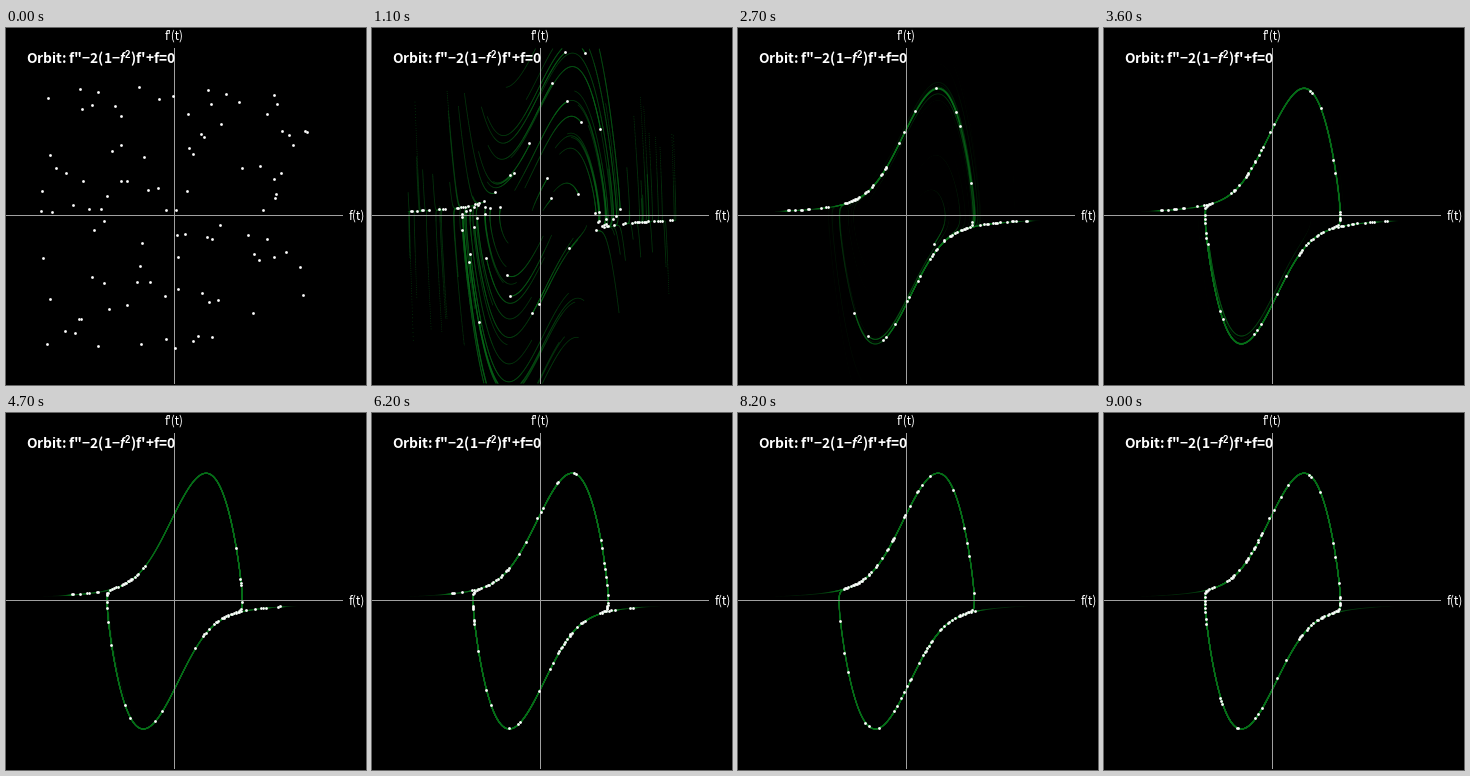
Recreate the animation shown at these times as a matplotlib script. Size 360x357 px, loop 9100 ms.

```python
import numpy as np
import matplotlib.pyplot as plt
from matplotlib.animation import FuncAnimation

W, H, DPI = 360, 357, 96
OX, OY, UNIT = 168.2, 187.6, 33.5      # origin and pixels per unit
LEFT, RIGHT, TOP, BOTTOM = 0, 336, 20, 355
MU, T_END, COUNT, REACH = 2, 12, 100, 4
STEPS, SUB = 85, 120                   # pictures after the first, substeps
HOLD = 5                               # extra ticks on the first picture
FRAMES = STEPS + 1 + HOLD
GREEN = np.array([6, 110, 24]) / 255
GRAY = "#a0a0a0"


def flow(s):
    x, y = s
    return np.array([y, MU * (1 - x * x) * y - x])


def rk4(s, h):
    a = flow(s)
    b = flow(s + h / 2 * a)
    c = flow(s + h / 2 * b)
    d = flow(s + h * c)
    return s + h / 6 * (a + 2 * b + 2 * c + d)


def to_px(s):
    return np.array([OX + UNIT * s[0], OY - UNIT * s[1]])


def inside(x, y):
    return (x >= LEFT) & (x < RIGHT) & (y >= TOP) & (y < BOTTOM)


def splat(pos, weight):
    """Spread weighted points over the pixel grid, bilinearly."""
    ok = inside(*pos)
    x, y, w = pos[0][ok], pos[1][ok], weight[ok]
    i, j = x.astype(int), y.astype(int)
    u, v = x - i, y - j
    grid = np.zeros(W * H)
    for di, wu in ((0, 1 - u), (1, u)):
        for dj, wv in ((0, 1 - v), (1, v)):
            grid += np.bincount((j + dj) * W + i + di, w * wu * wv, W * H)
    return grid


def simulate():
    """Dot positions and freshly drawn trail for every step."""
    state = np.random.default_rng(7).uniform(-REACH, REACH, (2, COUNT))
    dots, layers = [to_px(state)], [np.zeros(W * H)]
    h = T_END / STEPS / SUB
    for _ in range(STEPS):
        path = [to_px(state)]
        for _ in range(SUB):
            state = rk4(state, h)
            path.append(to_px(state))
        path = np.array(path)
        ds = np.hypot(*np.diff(path, axis=0).transpose(1, 0, 2))
        pos = path[1:].transpose(1, 0, 2).reshape(2, -1)
        layers.append(splat(pos, np.minimum(ds, 1).ravel()))
        dots.append(path[-1])
    return dots, np.array(layers, np.float32)


dots, layers = simulate()


def trail(n):
    age = n - np.arange(n + 1)
    fade = (np.exp(-age / 4.5) + 0.018).astype(np.float32)
    glow = np.maximum(fade @ layers[:n + 1] - 0.04, 0)
    level = 1 - np.exp(-1.6 * glow)
    return level.reshape(H, W, 1) * GREEN


def dot_mask(n):
    """Soft round dots centred on whole pixels."""
    x, y = np.round(dots[n]).astype(int)
    ok = inside(x, y)
    mask = np.zeros((H, W, 1))
    for dx in (-1, 0, 1):
        for dy in (-1, 0, 1):
            cell = y[ok] + dy, x[ok] + dx
            mask[cell] = np.maximum(mask[cell], min(1, 1.85 - np.hypot(dx, dy)))
    return mask


plt.rcParams.update({
    "font.family": "Noto Sans CJK JP",
    "mathtext.fontset": "custom",
    "mathtext.it": "Liberation Sans:italic:bold",
    "mathtext.rm": "Liberation Sans:bold",
})
fig = plt.figure(figsize=(W / DPI, H / DPI), dpi=DPI, facecolor="black")
ax = fig.add_axes([0, 0, 1, 1])
ax.axis("off")
picture = ax.imshow(np.zeros((H, W, 3)), interpolation="nearest", aspect="auto")
overlay = ax.imshow(np.zeros((H, W, 4)), interpolation="nearest",
                    aspect="auto", zorder=3)
ax.set_xlim(-0.5, W - 0.5)
ax.set_ylim(H - 0.5, -0.5)

for xs, ys in (((LEFT, RIGHT), (187, 187)), ((168, 168), (TOP, BOTTOM))):
    ax.plot(xs, ys, color=GRAY, lw=72 / DPI, snap=False, zorder=2)


def label(x, y, text, px, **kw):
    ax.text(x, y, text, color="white", fontsize=px * 72 / DPI,
            va="baseline", zorder=4, **kw)


label(19.5, 36, "Orbit: f\"\u22122(1\u2212$f^2$)f'+f=0", 13.7, weight="bold")
label(168, 11, "f'(t)", 11.5, ha="center")
label(342.5, 191, "f(t)", 11.8)


def update(k):
    n = max(0, k - HOLD)
    mask = dot_mask(n)
    picture.set_data(trail(n))
    overlay.set_data(np.concatenate([np.ones((H, W, 3)), mask], axis=2))
    return picture, overlay


anim = FuncAnimation(fig, update, frames=FRAMES, interval=100, repeat=True,
                     repeat_delay=0, blit=False)
plt.show()
```
